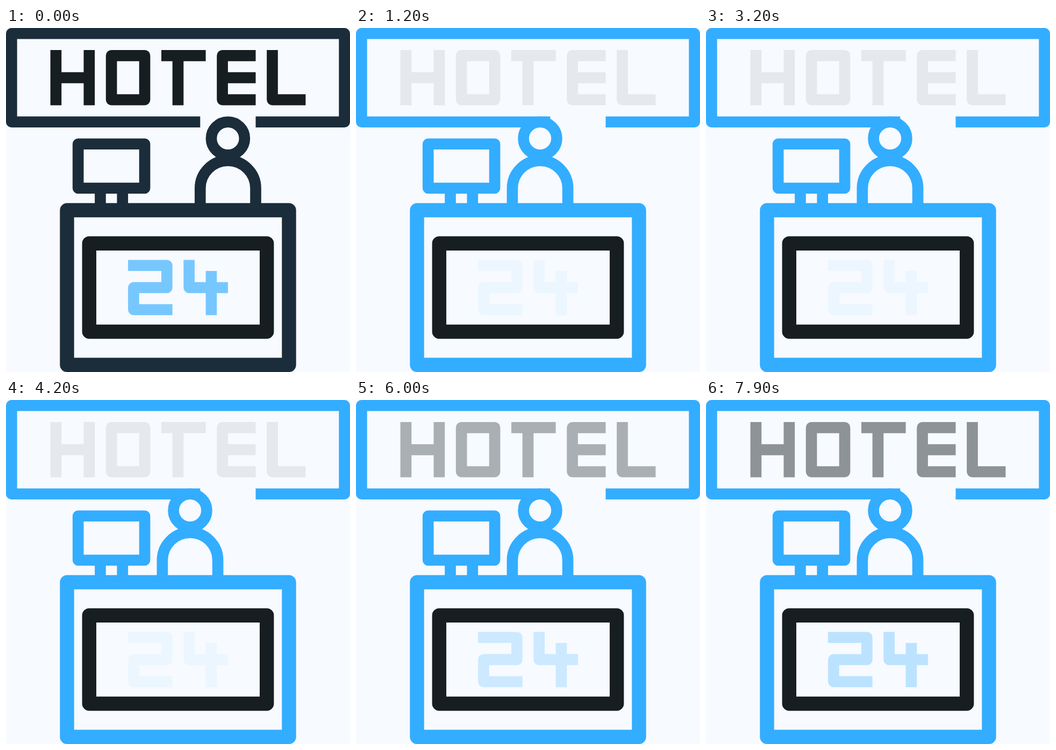
An HTML page with a canvas that plays this animation: 640x640 px, repeating every 8000 ms.

```html
<!DOCTYPE html>
<html lang="en">
<head>
<meta charset="utf-8">
<title>Hotel reception</title>
<style>
  html, body { margin: 0; width: 100%; height: 100%; overflow: hidden; background: #f7faff; }
  canvas { display: block; width: 640px; height: 640px; }
</style>
</head>
<body>
<canvas id="stage" width="640" height="640"></canvas>
<script>
const ctx = document.getElementById('stage').getContext('2d');

const LOOP = 8000, STEP = 100, INTRO = 900;
const PAPER = '#f7faff', INK = '#171e22', BLUE = '#33adff';
const DARK_RGB = [27, 45, 58], BLUE_RGB = [51, 173, 255];

// Icon grid: one cell equals one stroke width
const UX = 640 / 31, UY = 20.55;

const SIGN = new Path2D('M17.5 8.5H.5V.5H30.5V8.5H22.5');
const MONITOR = new Path2D('M6.5 10.5H12.5V14.5H6.5ZM8.5 14.5V16M10.5 14.5V16');
const PERSON = new Path2D(
  'M21.5 10A1.5 1.5 0 0 1 18.5 10A1.5 1.5 0 0 1 21.5 10Z' +
  'M17.5 16V14.5A2.5 2.5 0 0 1 22.5 14.5V16');
const TITLE = new Path2D(
  'M4.5 2V7M7.5 2V7M4.5 4.5H7.5' +
  'M9.5 2.5H12.5V6.5H9.5Z' +
  'M14 2.5H18M15.5 2.5V7' +
  'M22.5 2.5H19.5V6.5H22.5M19.5 4.5H22.5' +
  'M24 2V6.5H27');
const HOURS = new Path2D(
  'M11 21.5H14.5V23.5H11.5V25.5H15' +
  'M16.5 21V23.5H20M18.5 22V26');

function strokeGrid(path, color, alpha = 1, dx = 0) {
  ctx.save();
  ctx.translate(dx, 0);
  ctx.scale(UX, UY);
  ctx.globalAlpha = alpha;
  ctx.strokeStyle = color;
  ctx.lineWidth = 1;
  ctx.lineJoin = 'round';
  ctx.stroke(path);
  ctx.restore();
}

function frameBox(x, y, w, h, color) {
  ctx.strokeStyle = color;
  ctx.lineWidth = 26.4;
  ctx.lineJoin = 'round';
  ctx.strokeRect(x, y, w, h);
}

// Linear fade, short hold when faint, then a hard return
function blink(t) {
  if (t < 500) return 1;
  const p = (t - 500) % 1000;
  return p >= 900 ? 0.99 : 0.99 - 0.0013 * Math.min(p, 700);
}

function mix(k) {
  return `rgb(${DARK_RGB.map((c, i) => Math.round(c + (BLUE_RGB[i] - c) * k))})`;
}

function draw(t) {
  const k = Math.min(t / INTRO, 1);
  const line = mix(k);
  const glow = blink(t);

  ctx.fillStyle = PAPER;
  ctx.fillRect(0, 0, 640, 640);

  strokeGrid(SIGN, line);
  strokeGrid(MONITOR, line);
  strokeGrid(PERSON, line, 1, -70.4 * k);
  frameBox(113.5, 339, 413, 287.8, line);
  frameBox(154.8, 400.7, 330.4, 164.3, INK);
  strokeGrid(TITLE, INK, glow);
  strokeGrid(HOURS, BLUE, 0.65 * glow);
}

const start = performance.now();

function tick() {
  const t = (performance.now() - start) % LOOP;
  draw(Math.floor(t / STEP) * STEP);
  requestAnimationFrame(tick);
}
tick();
</script>
</body>
</html>
```
